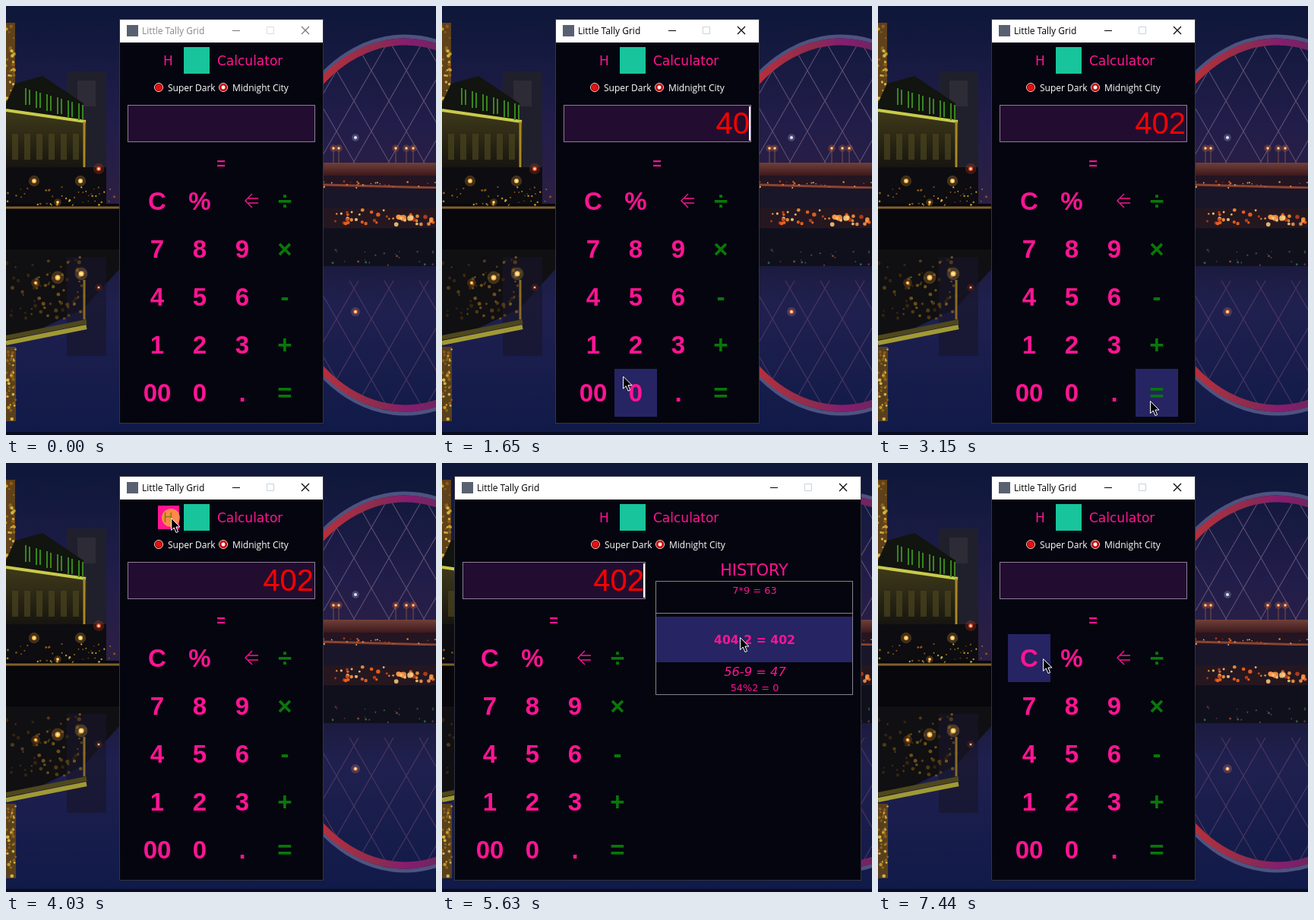
Animation of 566 by 564 pixels, one loop 7.46 s. Source, as an HTML page:

```html
<!DOCTYPE html>
<html lang="en">
<head>
<meta charset="utf-8">
<title>Calculator</title>
<style>
  html, body { margin: 0; width: 100%; height: 100%; overflow: hidden; background: #0d1436; }
  svg { display: block; width: 566px; height: 564px; }
  .ui { font-family: "Open Sans", "Noto Sans", sans-serif; }
  .head { font-family: "DejaVu Sans", sans-serif; }
  .key { font-family: "Liberation Sans", Arial, sans-serif; }
</style>
</head>
<body>
<svg viewBox="0 0 566 564">
  <defs>
    <linearGradient id="sky" x2="0" y2="1">
      <stop offset="0" stop-color="#0d1738"/><stop offset=".5" stop-color="#211d4a"/><stop offset="1" stop-color="#30203f"/>
    </linearGradient>
    <linearGradient id="water" x2="0" y2="1">
      <stop offset="0" stop-color="#171733"/><stop offset=".35" stop-color="#20204f"/><stop offset="1" stop-color="#101a48"/>
    </linearGradient>
    <linearGradient id="wall" x2="0" y2="1">
      <stop offset="0" stop-color="#3f3a1a"/><stop offset="1" stop-color="#15140f"/>
    </linearGradient>
    <linearGradient id="arch" gradientUnits="userSpaceOnUse" x1="417" x2="566">
      <stop offset="0" stop-color="#b5303c"/><stop offset=".5" stop-color="#8c2b50"/>
      <stop offset=".75" stop-color="#861d70"/><stop offset="1" stop-color="#71255f"/>
    </linearGradient>
    <linearGradient id="deck" x2="0" y2="1">
      <stop offset="0" stop-color="#70403a"/><stop offset="1" stop-color="#3d191c"/>
    </linearGradient>
  </defs>
  <g id="scene"></g>
  <g id="app"></g>
</svg>
<script>
const LOOP = 7460;
const PINK = '#ff1493', GREEN = '#087808', HOVER = '#262463', DARK = '#05050f';
const KEYS = ['C', '%', '⇐', '÷', '7', '8', '9', '×', '4', '5', '6', '-', '1', '2', '3', '+', '00', '0', '.', '='];

const rect = (x, y, w, h, fill, more = '') => `<rect x="${x}" y="${y}" width="${w}" height="${h}" fill="${fill}" ${more}/>`;
const circle = (x, y, r, fill, more = '') => `<circle cx="${x}" cy="${y}" r="${r}" fill="${fill}" ${more}/>`;
const path = (d, stroke, width = 1, more = '') => `<path d="${d}" fill="none" stroke="${stroke}" stroke-width="${width}" ${more}/>`;
const text = (s, x, y, size, fill, cls, anchor = 'middle', more = '') =>
  `<text x="${x}" y="${y}" font-size="${size}" fill="${fill}" class="${cls}" text-anchor="${anchor}" ${more}>${s}</text>`;

let seed = 11;
const random = () => (seed = seed * 16807 % 2147483647) / 2147483647;
const pick = list => list[Math.floor(random() * list.length)];

function lights(n, x, y, w, h, colors, size) {
  let out = '';
  for (let i = 0; i < n; i++) {
    out += circle(x + random() * w, y + random() * h, size * (.5 + random() * .7), pick(colors), 'opacity=".85"');
  }
  return out;
}

function lamp(x, y, color, r = 3) {
  return circle(x, y, r * 2.4, color, 'opacity=".22"') + circle(x, y, r, color) + circle(x, y, r * .5, '#fff0c0');
}

function scene() {
  const gold = ['#d7a829', '#e8c84d', '#8d6a1c', '#a05a18'];
  const fire = ['#ff9d3c', '#ff6a20', '#ffd48a', '#c8401c'];
  let s = rect(0, 0, 566, 300, 'url(#sky)') + rect(0, 300, 566, 264, 'url(#water)');

  // left bank
  s += rect(80, 86, 52, 174, '#20202c') + rect(94, 98, 24, 34, '#2c2b36');
  s += rect(0, 22, 12, 130, '#5f421b') + lights(36, 0, 24, 11, 122, gold, 2);
  s += '<path d="M12 102 48 92 102 128V262H0V128Z" fill="#11140f"/>';
  s += '<path d="M0 138 106 152V214H0Z" fill="url(#wall)"/>';
  s += path('M0 137 105 152', '#c9cb4c', 4) + path('M103 152V212', '#a88828', 3);
  for (let i = 0; i < 6; i++) {
    s += path(`M${26 + i * 14} ${108 + i * 4}v22m5-20v20`, '#39851f', 2);
    s += rect(8 + i * 16, 168, 8, 34, '#4a431e', 'opacity=".7"');
  }
  s += rect(0, 212, 132, 50, '#0d0c10') + rect(0, 260, 150, 62, '#07070c');
  s += path('M0 265H150', '#80602c', 3) + lights(45, 0, 238, 145, 24, gold, 1.3);
  s += lamp(37, 230, '#ffb03c') + lamp(98, 230, '#ffc050') + lamp(122, 214, '#f04b24') + lamp(68, 258, '#ffb03c', 2);

  // left reflection
  s += '<path d="M0 320H150V345L102 398 0 446Z" fill="#100f12"/>' + rect(80, 330, 52, 130, '#17162a', 'opacity=".65"');
  s += lights(75, 0, 330, 104, 82, ['#5a4218', '#7b5a1c', '#39280f'], 2.2);
  s += path('M0 443 106 422', '#a19a34', 6) + path('M0 436 106 415', '#4f481c', 6) + path('M103 360V412', '#876b25', 3);
  s += lamp(68, 357, '#ffb03c', 3.5) + lamp(99, 352, '#ffc050', 3.5) + lamp(39, 364, '#d98522', 2.5) + lamp(122, 370, '#a93e20', 2);
  s += rect(0, 448, 13, 98, '#59401d') + lights(42, 0, 448, 13, 98, gold, 2);

  // bridge and its reflection
  let cables = '';
  for (let x = 320; x < 700; x += 46) cables += `M${x} 45 ${x + 98} 215M${x} 45 ${x - 98} 215`;
  s += '<clipPath id="hoop"><ellipse cx="525" cy="288" rx="178" ry="243"/></clipPath>';
  s += `<g clip-path="url(#hoop)">${path(cables, '#756080', 1.1, 'opacity=".75"')}
    <g transform="matrix(1 0 0 -1 0 576)">${path(cables, '#64456f', 1.2, 'opacity=".6"')}</g></g>`;
  s += '<ellipse cx="525" cy="288" rx="181" ry="248" fill="none" stroke="#4d5380" stroke-width="5"/>';
  s += '<ellipse cx="525" cy="288" rx="177" ry="241" fill="none" stroke="url(#arch)" stroke-width="9"/>';
  s += rect(417, 206, 149, 17, 'url(#deck)') + rect(417, 223, 149, 17, '#241522') + path('M417 235 566 239', '#8a4432', 3);
  s += rect(417, 240, 149, 26, '#191629') + rect(417, 266, 149, 26, '#251720') + rect(417, 292, 149, 50, '#10101d');
  s += lights(34, 420, 268, 144, 19, fire, 2.3) + lights(15, 510, 276, 55, 12, ['#ffd07c', '#ff9a4a'], 3.4);
  s += lights(24, 417, 230, 148, 9, fire, 1.2) + lights(22, 420, 318, 144, 25, ['#5e354b', '#995040', '#377044'], 1.3);
  for (const x of [431, 438, 513, 527, 536]) s += lamp(x, 187, '#ff873c', 2) + path(`M${x} 189V207`, '#81513f');
  s += lamp(460, 173, '#d9e6ff', 2) + lamp(460, 402, '#ff9760', 2.5);
  return s + rect(0, 560, 566, 4, '#0a0d22');
}
document.getElementById('scene').innerHTML = scene();

// time, x, y of the pointer tip
const MOVES = [
  [180, 340, 165], [480, 330, 160], [1080, 247, 404], [1120, 247, 404], [1240, 205, 392], [1300, 205, 392],
  [1470, 252, 524], [1570, 252, 525], [1800, 203, 390], [1870, 203, 390], [2080, 378, 376], [2170, 378, 376],
  [2420, 258, 450], [2520, 258, 450], [2800, 359, 521], [3150, 358, 519], [3300, 358, 516], [3790, 232, 115],
  [3970, 217, 72], [4240, 217, 72], [4540, 310, 136], [4950, 388, 226], [5630, 392, 229], [6060, 390, 235],
  [6420, 217, 72], [6640, 217, 72], [6840, 212, 105], [7080, 205, 300], [7220, 215, 258], [7440, 217, 257]
];
const CLICKS = [430, 1250, 1490, 1820, 2090, 2450, 2840, 4000, 6470, 7260];
const ENTRIES = [[0, ''], [1270, '4'], [1510, '40'], [1840, '404'], [2110, '404-'], [2470, '404-2'], [2860, '402'], [7290, '']];

function pointer(t) {
  if (t < MOVES[0][0]) return [-99, -99];
  const i = MOVES.findIndex(m => m[0] > t);
  if (i < 0) return MOVES[MOVES.length - 1].slice(1);
  const [t0, x0, y0] = MOVES[i - 1], [t1, x1, y1] = MOVES[i];
  const p = (t - t0) / (t1 - t0), e = p * p * (3 - 2 * p);
  return [x0 + (x1 - x0) * e, y0 + (y1 - y0) * e];
}

function titleBar(left, right, active) {
  const ink = active ? '#000' : '#777';
  return rect(left, 18, right - left, 30, '#fff')
    + rect(left + 9, 25, 15, 15, '#596070')
    + text('Little Tally Grid', left + 29, 37, 12, active ? '#000' : '#888', 'ui', 'start')
    + path(`M${right - 119} 32.5h10`, ink)
    + path(`M${right - 73.5} 27.5h9v9h-9z`, active ? '#c6d4dc' : '#ddd')
    + path(`M${right - 28} 27l10 10m0-10l-10 10`, ink, 1.2);
}

function radio(x, label, on) {
  return circle(x, 107, 5.5, '#e01212', 'stroke="#f4dcdc"') + circle(x, 107, 4.5, 'none', 'stroke="#a00000"')
    + (on ? circle(x, 107, 2.4, '#fff') : '') + text(label, x + 12, 112, 12, '#fff', 'ui', 'start');
}

function keypad(shift, mx, my, pressed) {
  return KEYS.map((key, i) => {
    const x = 171 + i % 4 * 56 - shift, y = 225 + Math.floor(i / 4) * 63;
    const over = mx >= x && mx < x + 56 && my >= y && my < y + 63;
    const base = i % 4 === 3 ? GREEN : PINK;
    const ink = over && pressed ? DARK : base;
    const back = over ? rect(x, y, 56, 63, !pressed ? HOVER : base === PINK ? PINK : '#008000') : '';
    return back + (key === '⇐'
      ? path(`M${x + 49} ${y + 28}h-13m13 6h-13m5-12l-9 9 9 9`, ink, 1.4)
      : text(key, x + 28, y + 43, 33, ink, 'key', 'middle', 'font-weight="700"'));
  }).join('');
}

function history(mx, my) {
  const over = mx > 281 && mx < 540 && my > 202 && my < 262;
  return text('HISTORY', 411, 148, 20.7, PINK, 'head')
    + rect(281.5, 155.5, 259, 149, DARK, 'stroke="#85818d"')
    + path('M282 197.5H540', '#85818d')
    + (over ? rect(282, 202, 258, 60, HOVER) : '')
    + text('7*9 = 63', 411.5, 172, 13, PINK, 'head')
    + text('404-2 = 402', 411.5, 238, over ? 15.7 : 13, PINK, 'head', 'middle', over ? 'font-weight="700"' : '')
    + text('56-9 = 47', 412, 280, 16.3, PINK, 'head', 'middle', 'font-style="italic"')
    + text('54%2 = 0', 411.5, 300, 12.8, PINK, 'head');
}

function draw(t) {
  const open = t >= 4110 && t < 6560;
  const [left, right, shift] = open ? [17, 551, 136] : [150, 417, 0];
  const [mx, my] = pointer(t);
  const pressed = CLICKS.some(c => t >= c && t < c + 90);
  const entry = ENTRIES.filter(e => e[0] <= t).pop()[1];
  const entryLeft = left + 10, entryRight = open ? 268 : 407;
  const blink = t % 450;
  const caret = t > 450 && t < 7330 && blink >= 80 && blink < 380;
  const overH = mx >= 200 && mx < 228 && my >= 56 && my < 87;

  let s = rect(left - .5, 17.5, right - left + 1, 531, DARK, 'stroke="#34343f"') + titleBar(left, right, t >= 430);
  if (overH) s += rect(200, 56, 28, 31, pressed ? PINK : HOVER);
  s += text('H', 213.5, 78, 17, overH && pressed ? DARK : PINK, 'head')
    + rect(234, 54, 34, 35, '#18c49c')
    + text('Calculator', 278, 78, 17, PINK, 'head', 'start')
    + radio(open ? 202 : 201, 'Super Dark', false) + radio(open ? 287 : 286, 'Midnight City', true)
    + rect(entryLeft + .5, 130.5, entryRight - entryLeft - 1, 48, '#220d30', 'stroke="#8a7c96"')
    + text(entry, entryRight - 2, 168, 40, '#f00', 'key', 'end');
  if (caret) s += rect(entryRight - 3, 132, 2, 45, '#fff');
  s += text('=', 283 - shift, 214, 20, PINK, 'key', 'middle', 'font-weight="700"') + keypad(shift, mx, my, pressed);
  if (open) s += history(mx, my);
  if (pressed) s += circle(mx, my, 12, '#ff0', 'opacity=".5"');
  s += `<path transform="translate(${mx} ${my})" d="M.5 .5V16.5L4.2 13 7 19.5 9.6 18.4 6.9 12H12Z" fill="#000" stroke="#fff"/>`;
  document.getElementById('app').innerHTML = s;
}

const start = performance.now();
function tick() {
  draw((performance.now() - start) % LOOP);
  requestAnimationFrame(tick);
}
tick();
</script>
</body>
</html>
```
